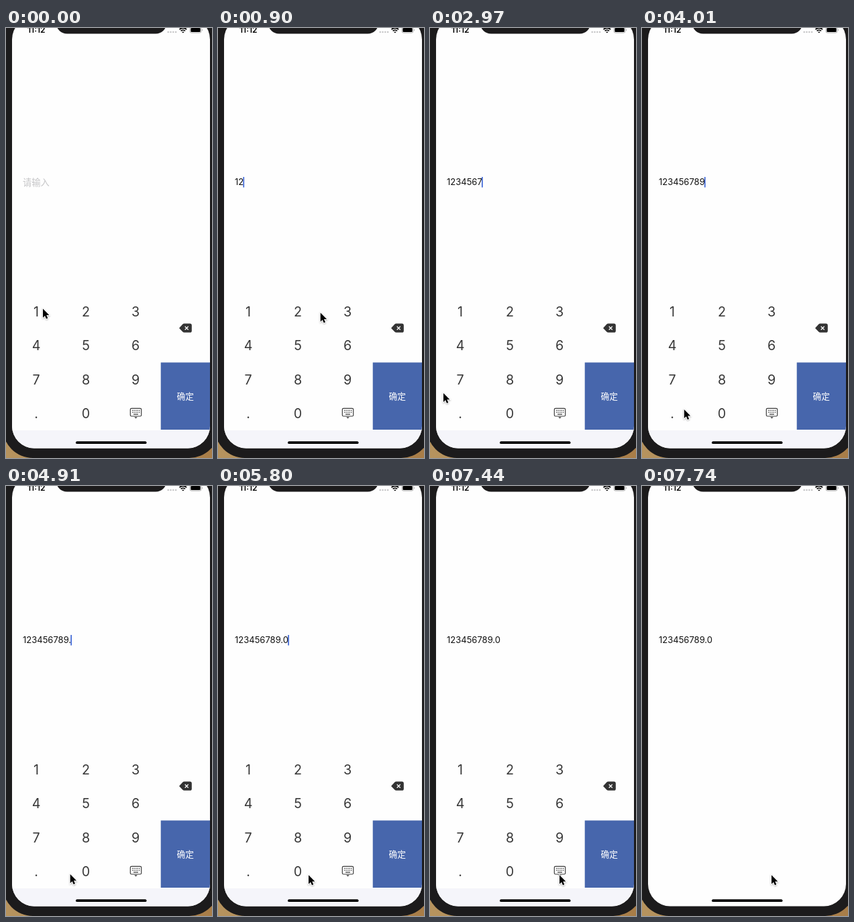
Animation, 307 px wide and 638 px high, one loop 8 s. Source, as an HTML page:

```html
<!DOCTYPE html>
<html lang="zh">
<head>
<meta charset="utf-8">
<style>
html, body { margin: 0; width: 100%; height: 100%; overflow: hidden; background: #b3915f; }
svg { display: block; font-family: Inter, Roboto, sans-serif; }
.cjk { font-family: "Noto Sans CJK SC", "Noto Sans CJK", sans-serif; }
#keys text { font-size: 19.7px; fill: #383838; text-anchor: middle; }
</style>
</head>
<body>
<svg width="307" height="638" viewBox="0 0 307 638">
  <defs>
    <clipPath id="screen"><rect x="9" y="-16" width="295" height="639.4" rx="33"/></clipPath>
    <linearGradient id="desk"><stop stop-color="#b6935e"/><stop offset="1" stop-color="#a87d48"/></linearGradient>
    <filter id="shadow" x="-50%" y="-50%" width="200%" height="200%">
      <feDropShadow dx="0" dy="1" stdDeviation=".8" flood-opacity=".35"/>
    </filter>
  </defs>
  <rect width="307" height="638" fill="url(#desk)"/>
  <rect x="-5" y="-40" width="323" height="678" rx="45" fill="#1c1b1c"/>

  <g clip-path="url(#screen)">
    <rect width="307" height="638" fill="#fefefe"/>
    <text id="hint" class="cjk" x="25" y="233.5" font-size="13.3" fill="#c5c5c7">请输入</text>
    <text id="entry" x="25" y="233" font-size="13" fill="#111"></text>
    <rect id="caret" y="221" width="1.7" height="15.5" fill="#3d66d6"/>

    <g id="pad">
      <rect x="9" y="396" width="295" height="201" fill="#fefefe"/>
      <rect x="9" y="597" width="295" height="60" fill="#f5f5fa"/>
      <g id="keys"></g>
      <path d="M258 445.2L263.3 439.6Q264.3 438.6 265.7 438.6H274.2Q276.8 438.6 276.8 441.2V449.2Q276.8 451.8 274.2 451.8H265.7Q264.3 451.8 263.3 450.8Z" fill="#333"/>
      <path d="M266.7 442.7l5 5m0-5l-5 5" stroke="#fff" stroke-width="1.3"/>
      <rect x="230.7" y="496.3" width="74" height="99.7" fill="#4766ac"/>
      <text class="cjk" x="267.3" y="550.7" font-size="12.7" font-weight="500" fill="#fff" text-anchor="middle">确定</text>
      <g stroke="#3c3c3c" fill="none">
        <rect x="185.3" y="564.3" width="16.4" height="11.7" rx="1.8" stroke-width="1.2"/>
        <path d="M188 567.4h11.5M188 570.2h11.5" stroke-width="1.3" stroke-dasharray="1.4 1.1"/>
        <path d="M190 573.2h7" stroke-width="1.2"/>
        <path d="M191.2 577.3h4.6l-2.3 2.3z" fill="#3c3c3c" stroke="none"/>
      </g>
    </g>

    <rect x="104" y="613.2" width="105.5" height="3.9" rx="1.95"/>
    <text x="32" y="7" font-size="12" font-weight="600">11:12</text>
    <path d="M241.7 6h12" stroke="#c6c6c8" stroke-width="2.6" stroke-linecap="round" stroke-dasharray="0 3.8"/>
    <g fill="none" stroke="#000" stroke-width="1.8">
      <path d="M258.5 2.2a7.6 7.6 0 0 1 10.6 0M260.6 4.4a4.6 4.6 0 0 1 6.4 0"/>
      <path d="M262.3 5.9a2.2 2.2 0 0 1 3 0l-1.5 1.6z" fill="#000" stroke="none"/>
    </g>
    <rect x="274" y="-1.2" width="17" height="8.4" rx="2.4" fill="none" stroke="#aaa" stroke-width=".9"/>
    <rect x="275.3" y="0" width="14.4" height="6" rx="1.3"/>
    <path d="M292.2 1.6a1.6 1.6 0 0 1 0 2.9z" fill="#aaa"/>
  </g>
  <rect x="75" y="-22" width="164" height="30.4" rx="15.8" fill="#1c1b1c"/>
  <path id="mouse" d="M0 0V13.2L3 10.4 5 15 7.3 14 5.3 9.5H9.4Z" stroke="#fff" stroke-width="1.6" paint-order="stroke" filter="url(#shadow)"/>
</svg>
<script>
const LOOP = 8000, STEP = 150, LEAD = 60, MOVE = 500;
const KEYS = '123456789.0', HIDE = '⌄';
const $ = id => document.getElementById(id);

const center = key => {
  const i = (KEYS + HIDE).indexOf(key);
  return [45 + i % 3 * 74, 420.5 + Math.floor(i / 3) * 50.6];
};

// Where the pointer goes: key, arrival time, optional offset from the key's centre
const stops = [
  ['1', 90, 10, -4], ['2', 600], ['3', 1050],
  ['4', 1620], ['5', 1900], ['6', 2200],
  ['7', 2940, -25, 20], ['8', 3400], ['9', 3690],
  ['.', 4050, 8, -3], [HIDE, 5200, -8, 18], ['0', 5700, 16, 5], [HIDE, 6650, 0, 5]
].map(([key, at, dx = -7, dy = 2]) => {
  const [x, y] = center(key);
  return { key, at, x: x + dx, y: y + dy };
});

for (const label of KEYS) {
  const key = document.createElementNS('http://www.w3.org/2000/svg', 'text');
  const [x, y] = center(label);
  key.setAttribute('x', x);
  key.setAttribute('y', y + 7);
  key.textContent = label;
  $('keys').append(key);
}

// Rests on each stop, then eases to the next one just in time
function pointer(t) {
  const i = stops.findIndex(s => s.at > t);
  const to = stops.at(i), from = stops[i - 1];
  if (!from) return [to.x, to.y];
  const begin = Math.max(from.at, to.at - MOVE);
  const k = Math.max(0, (t - begin) / (to.at - begin));
  const e = k * k * (3 - 2 * k);
  return [from.x + (to.x - from.x) * e, from.y + (to.y - from.y) * e];
}

function show(id, on) {
  $(id).style.display = on ? '' : 'none';
}

function draw(time) {
  const t = Math.floor((time + LEAD) / STEP) * STEP - LEAD;
  const typed = stops.filter(s => s.at <= t && s.key !== HIDE).map(s => s.key).join('');
  const drop = 20 * (Math.max(0, t - 7425) / 165) ** 4;
  $('entry').textContent = typed;
  show('hint', !typed);
  show('caret', typed && t < 6540);
  $('caret').setAttribute('x', 24.2 + $('entry').getComputedTextLength());
  $('mouse').setAttribute('transform', `translate(${pointer(t)})`);
  $('pad').setAttribute('transform', `translate(0 ${drop})`);
}

const start = performance.now();
function frame() {
  draw((performance.now() - start) % LOOP);
  requestAnimationFrame(frame);
}
frame();
</script>
</body>
</html>
```
